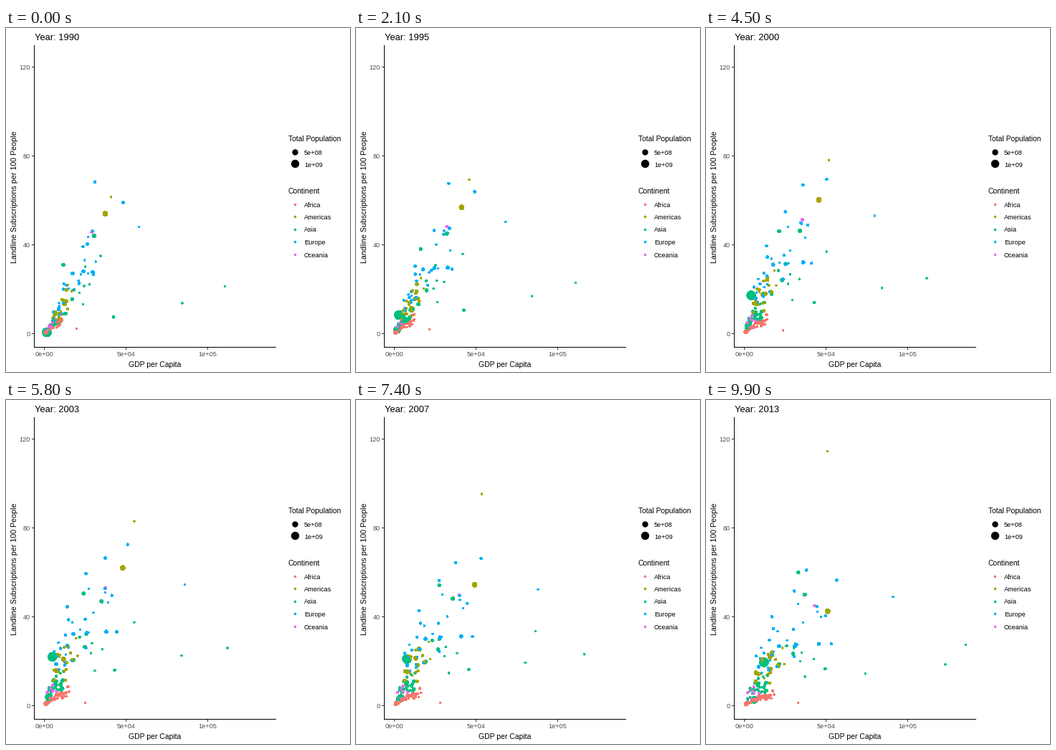
A matplotlib script that plays this animation: 480x480 px, repeating every 10000 ms.

```python
import matplotlib.pyplot as plt
import numpy as np
from matplotlib.animation import FuncAnimation
from matplotlib.patches import Rectangle

SIZE, FRAMES, INTERVAL = 480, 100, 100
PEAK = 58  # landlines peak around 2003
GREY = "#4D4D4D"
COLORS = {"Africa": "#F8766D", "Americas": "#A3A500", "Asia": "#00BF7D",
          "Europe": "#00B0F6", "Oceania": "#E76BF3"}
AF, AM, AS, EU, OC = COLORS.values()

plt.rcParams["font.family"] = "Liberation Sans"
rng = np.random.default_rng(11)
fig = plt.figure(figsize=(SIZE / 72, SIZE / 72), dpi=72, facecolor="white")
ax = fig.add_axes([0, 0, 1, 1])
ax.set(xlim=(0, SIZE), ylim=(SIZE, 0))
ax.axis("off")


def to_x(wealth):
    """Stage x of a GDP per capita in thousands."""
    return 53.5 + 2.28 * wealth


def to_y(lines):
    """Stage y of landlines per 100 people."""
    return 426.5 - 3.1 * lines


countries = []


def country(color, radius, start, peak, end):
    """Move a (wealth, lines) pair from 1990 through the peak to 2013."""
    wealth, lines = (np.interp(np.arange(FRAMES), [0, PEAK, FRAMES - 1], v)
                     for v in zip(start, peak, end))
    path = np.column_stack([to_x(wealth), to_y(lines)])
    countries.append((radius, color, path))


def region(color, count, low, high, ratio, lift, skew=1.0):
    """Countries whose lines follow wealth, then catch up by `lift`."""
    for _ in range(count):
        wealth = low + (high - low) * rng.random() ** skew
        lines = wealth * ratio * rng.uniform(0.6, 1.4)
        gain = lift * rng.uniform(0.4, 1.5)
        growth = rng.uniform(0.8, 1.2)
        radius = rng.choice([1.2, 1.7, 2.3], p=[0.4, 0.4, 0.2])
        country(color, radius, (wealth, lines),
                (wealth * 1.25 * growth, lines * 0.9 + gain),
                (wealth * 1.5 * growth, lines * 0.7 + gain))


# Giants and outliers
country(AS, 6.3, (1.5, 0.6), (5, 22), (12, 19.5))
country(AS, 5, (1.2, 0.6), (2.8, 4), (6, 2.6))
country(AM, 3.4, (37.3, 54), (48, 62), (51, 42.5))
country(AM, 3, (10, 6), (11.7, 21), (15.6, 22))
country(AS, 2.5, (30.5, 44), (35, 47), (37, 50))
country(AS, 2.3, (11.7, 31), (24, 50.5), (33, 60))
country(AS, 1.8, (42.3, 7.5), (43, 16), (49.5, 16.6))
country(AS, 1.2, (110.5, 21.3), (112, 26), (123, 18.6))
country(AS, 1.2, (84.5, 13.7), (84, 22.5), (74, 14.4))
country(AS, 1.2, (34.5, 35), (55, 37.5), (135.5, 27.5))
country(EU, 1.2, (58, 48), (86, 54.5), (91, 49))
country(EU, 1.8, (48.2, 59), (51, 72.5), (56.5, 56.5))
country(EU, 1.8, (31, 68.3), (37.3, 66.5), (38, 61))
country(AM, 1.2, (40.7, 61.5), (55, 83), (51, 114.5))
country(OC, 1.8, (29, 45.6), (37.5, 53), (43, 45))
country(AF, 1.2, (19.7, 2.3), (25, 1.2), (33, 1.3))

region(EU, 32, 5, 32, 1.35, 17)
region(AM, 26, 4, 17, 1.1, 10, skew=1.5)
region(AS, 12, 5, 32, 0.9, 9, skew=1.5)
region(AS, 26, 1, 9, 0.7, 5)
region(AF, 45, 0.4, 11, 0.6, 0.6, skew=2.5)
region(OC, 7, 1.5, 6, 0.9, 4)

countries.sort(key=lambda c: -c[0])
radii, colors, paths = zip(*countries)


def dots(xy, radius, color):
    xy = np.asarray(xy, float)
    return ax.scatter(xy[:, 0], xy[:, 1], s=(2 * np.asarray(radius)) ** 2,
                      c=color, linewidths=0, antialiased=False, snap=False)


def label(x, y, text, size=9.1, color="black", **kw):
    return ax.text(x, y, text, size=size, color=color,
                   **{"va": "baseline", **kw})


def bar(x, y, w, h, color="black"):
    ax.add_patch(Rectangle((x, y), w, h, color=color, lw=0,
                           antialiased=False))


# Axes
bar(39, 24, 1, 422)
bar(39, 445, 338, 1)
for lines in (0, 40, 80, 120):
    y = int(to_y(lines))
    bar(36, y, 3, 1, "#333333")
    label(33.5, y + 3.5, str(lines), color=GREY, ha="right")
for wealth, text in ((0, "0e+00"), (50, "5e+04"), (100, "1e+05")):
    x = int(to_x(wealth))
    bar(x, 446, 1, 3, "#333333")
    label(x + 0.5, 458, text, color=GREY, ha="center")
label(207.5, 473, "GDP per Capita", 10.4, ha="center")
label(17, 236, "Landline Subscriptions per 100 People", 10.6,
      rotation=90, ha="right", va="center")

# Legends
label(394, 158, "Total Population", 10.4)
for y, radius, text in ((172.5, 4.2, "5e+08"), (189, 5.7, "1e+09")):
    dots([[402.5, y]], [radius], "black")
    label(416, y + 4.5, text)
label(394, 231, "Continent", 10.4)
for i, (name, color) in enumerate(COLORS.items()):
    y = 245.5 + 17.5 * i
    dots([[402.5, y]], [1.8], color)
    label(416, y + 4, name)

title = label(39.5, 17, "", 12.9)
cloud = dots([p[0] for p in paths], radii, colors)


def update(frame):
    year = 1990 + 23 * frame / (FRAMES - 1)
    title.set_text(f"Year: {round(year)}")
    cloud.set_offsets([p[frame] for p in paths])
    return cloud, title


anim = FuncAnimation(fig, update, frames=FRAMES, interval=INTERVAL,
                     repeat=True, repeat_delay=0)
plt.show()
```
